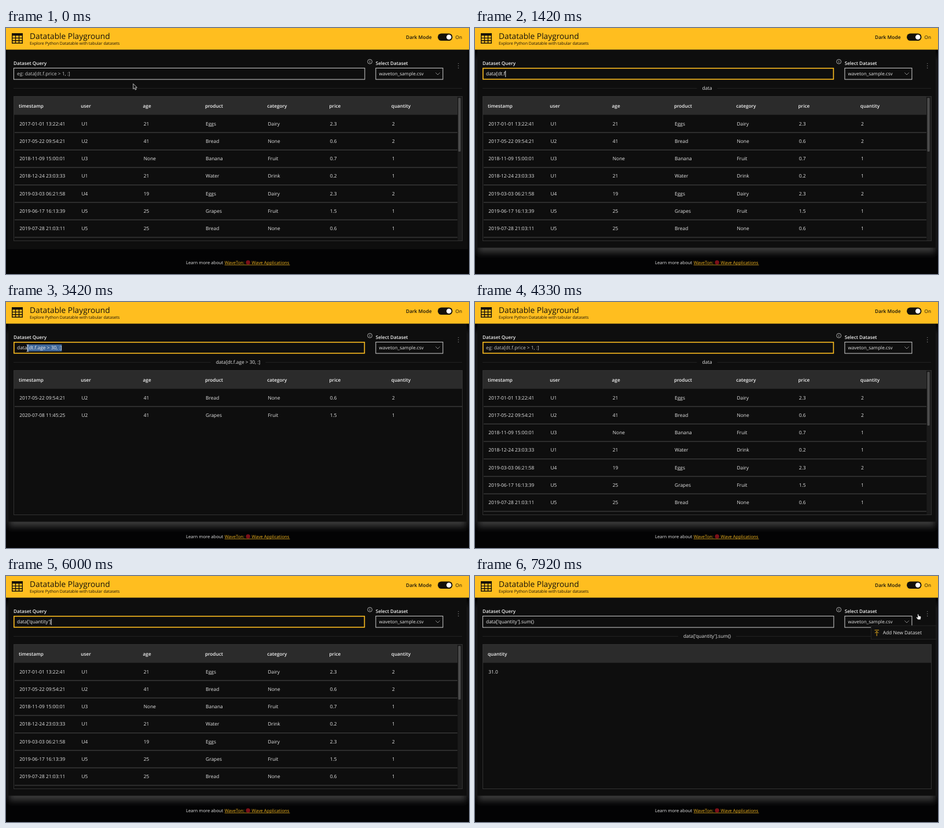
Write an HTML page that moves like this. It is 800 by 426 pixels and loops after 8 s.

```html
<!DOCTYPE html>
<html lang="en">
<head>
<meta charset="utf-8">
<title>Datatable Playground</title>
<style>
  html, body { margin: 0; width: 100%; height: 100%; overflow: hidden; background: #030304; }
  svg { display: block; width: 800px; height: 426px; }
  text { font-family: "Open Sans", "Noto Sans", sans-serif; fill: #e6e6e6; white-space: pre; text-rendering: geometricPrecision; }
  .b { font-weight: 600; fill: #f4f4f4; }
  .dark, .dark.b { fill: #14110a; }
</style>
</head>
<body>
<svg id="stage" viewBox="0 0 800 426" xmlns="http://www.w3.org/2000/svg">
  <defs>
    <filter id="soft" x="-5%" y="-10%" width="110%" height="120%"><feGaussianBlur stdDeviation="6"/></filter>
    <clipPath id="tableClip"><rect x="13" y="118" width="776" height="250"/></clipPath>
  </defs>
  <rect width="800" height="426" fill="#030304"/>
  <rect id="glow" x="5" y="48" width="790" height="341" fill="#3a3a3a" filter="url(#soft)"/>
  <rect x="2" y="37" width="796" height="346" fill="#0e0e0e" id="card"/>
  <rect width="800" height="37.5" fill="#ffbe1f"/>

  <g id="icon" fill="none" stroke="#14110a" stroke-width="1.4">
    <path d="M10.7 9.7H28.3V26.3H10.7ZM10.7 17.4H28.3M10.7 21.8H28.3M16.5 13V26.3M22.5 13V26.3"/>
    <path d="M10 11.3H29" stroke-width="4"/>
  </g>
  <text class="dark" x="41" y="18.7" font-size="13.75">Datatable Playground</text>
  <text class="dark" x="41" y="28.7" font-size="7.1">Explore Python Datatable with tabular datasets</text>
  <text class="dark b" x="691" y="18.8" font-size="8.4">Dark Mode</text>
  <rect x="746" y="9.4" width="25.5" height="12.6" rx="6.3" fill="#14110a"/>
  <circle cx="765.3" cy="15.7" r="4.3" fill="#fff"/>
  <text class="dark" x="776.6" y="18.8" font-size="8.2">On</text>

  <text class="b" x="13" y="63.5" font-size="8.2">Dataset Query</text>
  <text class="b" x="638.7" y="63.5" font-size="8.15">Select Dataset</text>
  <g fill="none" stroke="#d2d2d2" stroke-width=".8">
    <circle cx="628.7" cy="58.2" r="3.9"/>
    <path d="M628.7 57.5V60.4M628.7 55.8V56.6"/>
    <rect x="638.9" y="69.4" width="116" height="19.6" stroke-width="1"/>
    <path d="M742.3 77.3L746 81L749.7 77.3" stroke="#aaa"/>
  </g>
  <text x="644.5" y="82.4" font-size="8.1">waveton_sample.csv</text>
  <g fill="#929292"><circle cx="781.7" cy="61.6" r=".7"/><circle cx="781.7" cy="65.4" r=".7"/><circle cx="781.7" cy="69.2" r=".7"/></g>

  <rect id="box" fill="#0e0e0e"/>
  <rect id="mark" y="73.5" height="12" fill="#41699b"/>
  <text id="query" x="19" y="82.4" font-size="8.4"></text>
  <rect id="caret" y="74" width=".9" height="11" fill="#f2f2f2"/>

  <path id="rule" stroke="#222" fill="none"/>
  <text id="title" x="401" y="107.4" font-size="8.3" text-anchor="middle"></text>

  <g clip-path="url(#tableClip)">
    <rect id="head" x="14" y="119" height="31.3" fill="#2b2b2b"/>
    <g id="full"></g><g id="older"></g><g id="single"></g><g id="total"></g>
    <g id="scroll"><rect x="780.5" y="119" width="8" height="250" fill="#1b1b1b"/><rect x="781.4" y="121" width="4.2" height="93" rx="1.5" fill="#4c4c4c"/></g>
  </g>
  <rect x="13.5" y="118.5" width="775" height="250" fill="none" stroke="#323232"/>

  <g font-size="7.65">
    <text x="311" y="408.9">Learn more about</text>
    <text x="377.7" y="408.9" style="fill:#f2b51f">WaveTon:</text>
    <text x="424.6" y="408.9" style="fill:#f2b51f">Wave Applications</text>
  </g>
  <path d="M377.7 410.3H490.5" stroke="#d9a31f" stroke-width=".8"/>
  <circle cx="418.2" cy="406" r="3.7" fill="#7c1018"/>

  <g id="menu">
    <rect x="684.5" y="86" width="112.5" height="23.5" fill="#111" stroke="#232323"/>
    <path d="M690.5 93.8H698M694.2 104V96M691 99L694.2 95.8L697.4 99" fill="none" stroke="#ffbe1f" stroke-width=".9"/>
    <text x="704.7" y="101.2" font-size="8.4">Add New Dataset</text>
  </g>

  <path id="arrow" d="M0 0V9.2L2.1 7.3L3.6 10.6L5.3 9.8L3.9 6.6H6.6Z" fill="#111" stroke="#eee" stroke-width=".8"/>
  <path id="beam" d="M-1.8 -6Q0 -6 0 -4.8Q0 -6 1.8 -6M0 -5V5M-1.8 6Q0 6 0 4.8Q0 6 1.8 6M-1 1.5H1" fill="none" stroke="#ddd" stroke-width=".9"/>
  <path id="hand" d="M-1.8 -4.6Q-.9 -5.4 -.2 -4.5L.4 -1.9L3.2 -1.2Q4.2 -.8 4 .5L3.3 4.6H-1.2L-3.8 1.2Q-4.1 0 -3 0L-1.3 1.1Z" fill="#fff" stroke="#222" stroke-width=".6"/>
</svg>
<script>
const $ = id => document.getElementById(id);
const set = (id, attrs) => { for (const k in attrs) $(id).setAttribute(k, attrs[k]); };
const show = (id, on) => set(id, { visibility: on ? "visible" : "hidden" });
const LOOP = 8000, STEP = 1000 / 12;
const QUANTITY = "data['quantity']";
const FILTER = "data[dt.f.age > 30, :]";
const SUM = QUANTITY + ".sum()";

const names = "timestamp user age product category price quantity".split(" ");
const records = [
  "2017-01-01 13:22:41|U1|21|Eggs|Dairy|2.3|2",
  "2017-05-22 09:54:21|U2|41|Bread|None|0.6|2",
  "2018-11-09 15:00:01|U3|None|Banana|Fruit|0.7|1",
  "2018-12-24 23:03:33|U1|21|Water|Drink|0.2|1",
  "2019-03-03 06:21:58|U4|19|Eggs|Dairy|2.3|2",
  "2019-06-17 16:13:39|U5|25|Grapes|Fruit|1.5|1",
  "2019-07-28 21:03:11|U5|25|Bread|None|0.6|1"
].map(r => r.split("|"));
const older = [records[1], "2020-07-08 11:45:25|U2|41|Grapes|Fruit|1.5|1".split("|")];

function fillTable(id, heads, rows, scrolls) {
  const label = (s, x, y, extra) => `<text x="${x}" y="${y}" ${extra}>${s}</text>`;
  let out = heads.map((h, i) => label(h, 22 + 107.3 * i, 138.2, 'class="b" font-size="8.2"')).join("");
  rows.forEach((row, r) => {
    const y = 168.6 + 30.25 * r;
    out += row.map((c, i) => label(c, 23.2 + 107.3 * i, y, 'font-size="8.4"')).join("");
    if (scrolls || r < rows.length - 1)
      out += `<path d="M15 ${y + 12.4}H${scrolls ? 780 : 788}" stroke="#373737" stroke-width="1.3"/>`;
  });
  $(id).innerHTML = out;
}
fillTable("full", names, records, true);
fillTable("older", names, older, false);
fillTable("single", ["quantity"], records.map(r => [r[6]]), true);
fillTable("total", ["quantity"], [["31.0"]], false);

// [time, number of characters typed]
const typing = [
  { text: FILTER, keys: [[1000, 2], [1083, 3], [1167, 4], [1250, 5], [1333, 8], [1417, 9], [1500, 10], [1583, 11],
    [1667, 12], [1750, 13], [1833, 16], [2167, 18], [2333, 20], [2500, 21], [2583, 22], [3833, 0]] },
  { text: SUM, keys: [[4583, 1], [4667, 2], [4750, 3], [4833, 4], [5083, 5], [5167, 6], [5333, 7], [5417, 8], [5500, 10],
    [5583, 11], [5667, 13], [5750, 14], [5917, 15], [6000, 16], [6667, 18], [6750, 19], [6833, 20], [7000, 22]] }
];
const titles = [[0, ""], [1250, "data"], [2833, FILTER], [4083, "data"], [5333, ""], [6250, QUANTITY], [7333, SUM]];
const tables = [[0, "full"], [2833, "older"], [4083, "full"], [6250, "single"], [7333, "total"]];
const pointer = [
  // [start, end, shape, points of [time, x, y]]
  [0, 420, "arrow", [[0, 219.8, 96.5], [80, 219.8, 96.5], [420, 176, 86]]],
  [420, 1000, "beam", [[420, 176, 82], [667, 150, 79.5]]],
  [2833, 3833, "beam", [[2833, 150, 72], [3083, 98, 79.5], [3417, 37.5, 80], [3583, 18, 80]]],
  [7417, 7583, "beam", [[7417, 60, 80], [7583, 390, 78]]],
  [7583, 7750, "arrow", [[7583, 520, 75], [7750, 740, 68]]],
  [7750, 8000, "hand", [[7750, 772, 68], [7833, 781, 67], [7917, 766.5, 71]]]
];

const last = (list, t) => list.reduce((v, [at, x]) => t >= at ? x : v, list[0][1]);
function along(points, t) {
  const n = points.findIndex(p => p[0] >= t);
  if (n < 0) return points[points.length - 1].slice(1);
  if (n === 0) return points[0].slice(1);
  const a = points[n - 1], b = points[n], k = (t - a[0]) / (b[0] - a[0]);
  return [a[1] + (b[1] - a[1]) * k, a[2] + (b[2] - a[2]) * k];
}

function draw(time) {
  const t = Math.floor((time + 3) / STEP) * STEP + 1;
  const run = typing[t < 4583 ? 0 : 1];
  const count = t < run.keys[0][0] ? 0 : last(run.keys, t);
  const typed = run.text.slice(0, count);
  const focus = t >= 500 && t < 7833;
  const query = $("query"), title = $("title");

  query.textContent = typed || "eg: data[dt.f.price > 1, :]";
  query.style.fill = typed ? "#eee" : "#c6c6c6";
  const end = 19 + query.getComputedTextLength();
  set("box", focus
    ? { x: 13.8, y: 69.7, width: 605.6, height: 19, stroke: "#ffbe1f", "stroke-width": 1.6 }
    : { x: 13.4, y: 69.4, width: 606.5, height: 19.6, stroke: "#d2d2d2", "stroke-width": 1 });

  const spot = pointer.find(p => t >= p[0] && t < p[1]);
  ["arrow", "beam", "hand"].forEach(id => show(id, spot && spot[2] === id));
  let x = 0, y = 0;
  if (spot) {
    [x, y] = along(spot[3], t);
    set(spot[2], { transform: `translate(${x} ${y})` });
  }

  const marking = t >= 3083 && t < 3833;
  show("mark", marking);
  if (marking) {
    let i = 0;
    while (i < count && query.getStartPositionOfChar(i).x < x - 2) i++;
    const from = i < count ? query.getStartPositionOfChar(i).x : end;
    set("mark", { x: from, width: Math.max(0, end - from) });
  }
  show("caret", focus && typed && !marking);
  set("caret", { x: end });

  title.textContent = last(titles, t);
  const half = title.textContent ? title.getComputedTextLength() / 2 + 9 : 0;
  set("rule", { d: `M13 104.5H${401 - half}M${401 + half} 104.5H788` });

  const table = last(tables, t);
  const scrolls = table === "full" || table === "single";
  ["full", "older", "single", "total"].forEach(id => show(id, id === table));
  show("scroll", scrolls);
  set("head", { width: scrolls ? 766 : 774 });
  show("menu", t >= 7833);

  const lit = Math.min(1, Math.max(0, (t - 80) / 320));
  set("glow", { opacity: lit });
  set("card", { x: 2 + 2 * lit, width: 796 - 4 * lit, height: 346 - 2.5 * lit });
}

const start = performance.now();
function tick() {
  draw((performance.now() - start) % LOOP);
  requestAnimationFrame(tick);
}
draw(0);
requestAnimationFrame(tick);
</script>
</body>
</html>
```
